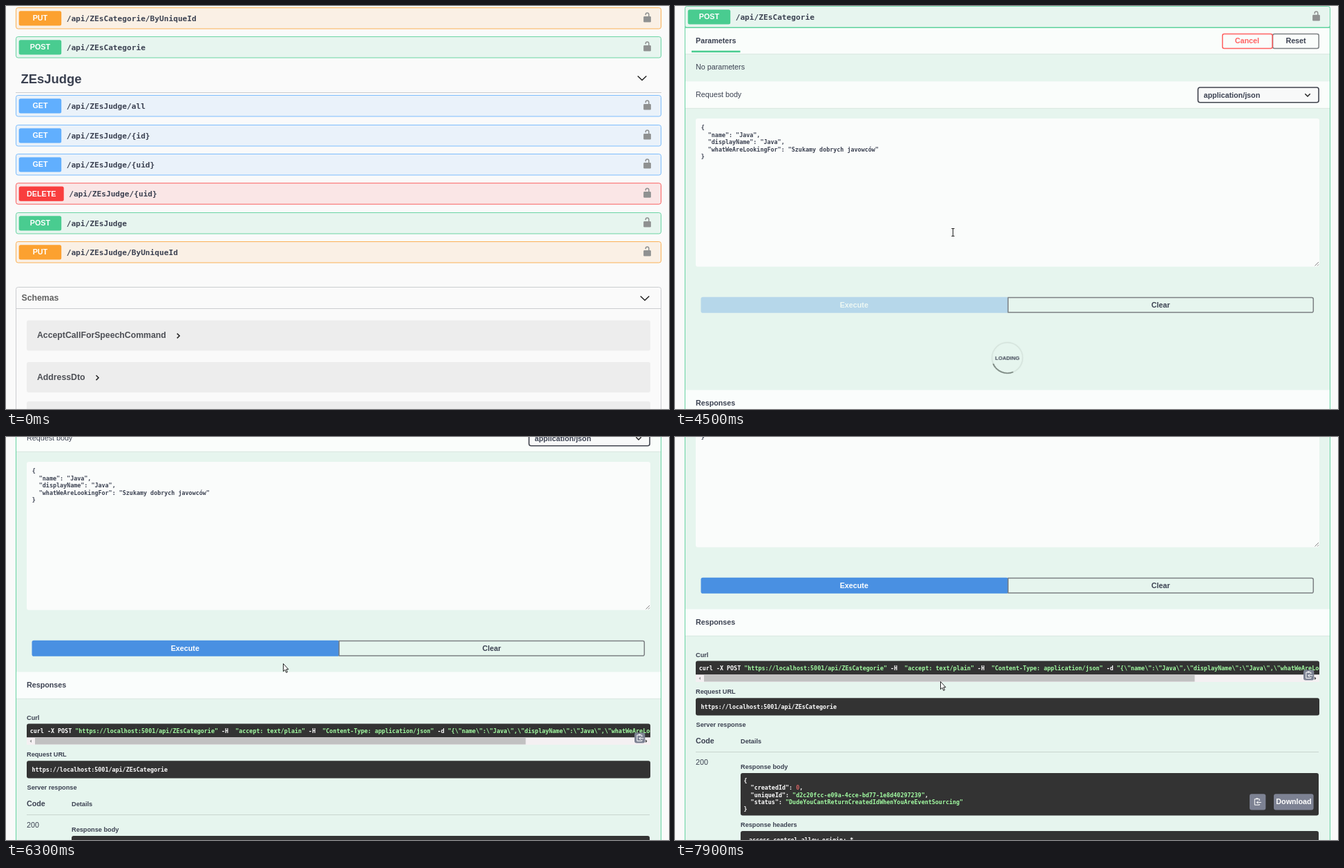
Write an HTML page that moves like this. It is 960 by 584 pixels and loops after 8000 ms.

```html
<!DOCTYPE html>
<html lang="en">
<head>
<meta charset="utf-8">
<title>API console</title>
<style>
html, body { margin: 0; width: 100%; height: 100%; overflow: hidden; background: #fafafa; }
svg { display: block; }
text { font: 10.74px "Liberation Sans", Arial, sans-serif; fill: #3b4151; white-space: pre; }
.b { font-weight: bold; }
.s { font-size: 9.2px; font-weight: bold; }
.l { font-size: 12.27px; font-weight: bold; fill: #4d4f55; }
.h { font-size: 18.4px; font-weight: bold; }
.m { font: bold 8.4px "DejaVu Sans Mono", monospace; }
.path { font: bold 11.16px "DejaVu Sans Mono", monospace; }
.w { fill: #fff; }
.str { fill: #a2fca2; }
.num { fill: #d36363; }
.c { text-anchor: middle; }
.line { fill: none; stroke: #222; stroke-width: 1.5; }
.rule { stroke: #cbcdd0; fill: none; }
.band { fill: #fff; fill-opacity: .8; }
.edge { stroke: #d9e7e0; }
.btn { fill: none; stroke: #7c8083; stroke-width: 1.5; }
.dark { fill: #333; }
.tool { fill: #7d8293; }
.schema { fill: #ededed; }

/* one loop is 8 s, so 1.25% is 100 ms */
.a { animation: 8s step-end infinite; }
#closed { animation-name: closed; }
#open { animation-name: open; opacity: 0; }
#page { animation-name: scroll; }
#tail { animation-name: push; }
#exec { animation-name: exec; }
#loader { animation-name: loader; opacity: 0; }
#arc { animation-name: spin; }
#cursor { animation-name: move; }
#arrow { animation-name: arrow; }
#hand { animation-name: hand; }
#beam { animation-name: beam; }

@keyframes closed { 0% { opacity: 1 } 18.75%, 100% { opacity: 0 } }
@keyframes open { 0% { opacity: 0 } 18.75%, 100% { opacity: 1 } }
@keyframes scroll {
  0% { transform: translateY(0) }
  50% { transform: translateY(0); animation-timing-function: steps(9) }
  61.25% { transform: translateY(-79.3px); animation-timing-function: steps(8) }
  71.25% { transform: translateY(-143px); animation-timing-function: steps(6) }
  78.75% { transform: translateY(-171px); animation-timing-function: steps(2) }
  81.25% { transform: translateY(-179px) }
  82.5% { transform: translateY(-179px); animation-timing-function: steps(6) }
  90% { transform: translateY(-209.5px); animation-timing-function: steps(7) }
  98.75%, 100% { transform: translateY(-262px) }
}
@keyframes push {
  0% { transform: translateY(0) }
  47.5% { transform: translateY(89px) }
  75%, 100% { transform: translateY(0) }
}
@keyframes exec {
  0% { opacity: 1 } 47.5% { opacity: .9 } 51.25% { opacity: .3 } 75%, 100% { opacity: 1 }
}
@keyframes loader { 0% { opacity: 0 } 47.5% { opacity: 1 } 75%, 100% { opacity: 0 } }
@keyframes spin {
  0% { transform: rotate(-433deg) }
  47.5% { transform: rotate(-433deg); animation-timing-function: steps(22) }
  75%, 100% { transform: rotate(433deg) }
}
@keyframes move {
  0% { transform: translate(915px, 35px) }
  11.25% { transform: translate(915px, 35px); animation-timing-function: steps(5) }
  17.5% { transform: translate(424px, 66px) }
  25% { transform: translate(423px, 65px) }
  28.75% { transform: translate(423px, 65px); animation-timing-function: steps(4) }
  33.75% { transform: translate(398px, 210px); animation-timing-function: steps(5) }
  40% { transform: translate(297px, 458px); animation-timing-function: steps(3) }
  43.75% { transform: translate(297px, 481px) }
  50% { transform: translate(297px, 481px); animation-timing-function: steps(3) }
  53.75% { transform: translate(401px, 328px) }
  93.75% { transform: translate(401px, 328px); animation-timing-function: steps(4) }
  98.75%, 100% { transform: translate(384px, 354px) }
}
@keyframes arrow {
  0% { opacity: 0 } 1.25% { opacity: 1 } 13.75% { opacity: 0 }
  30% { opacity: 1 } 33.75% { opacity: 0 } 40% { opacity: 1 } 41.25% { opacity: 0 }
  51.25% { opacity: 1 } 52.5% { opacity: 0 } 75%, 100% { opacity: 1 }
}
@keyframes hand {
  0% { opacity: 0 } 13.75% { opacity: 1 } 30% { opacity: 0 }
  41.25% { opacity: 1 } 51.25%, 100% { opacity: 0 }
}
@keyframes beam {
  0% { opacity: 0 } 33.75% { opacity: 1 } 40% { opacity: 0 }
  52.5% { opacity: 1 } 75%, 100% { opacity: 0 }
}
</style>
</head>
<body>
<svg width="960" height="584" viewBox="0 0 960 584">
  <defs>
    <g id="lock" fill="#8f9191">
      <rect x="-5.4" y="-2" width="10.8" height="8.6" rx="1.3"/>
      <path d="M-2.3-3.6V-4.6a2.3 2.3 0 0 1 4.6 0V-1" fill="none" stroke="#8f9191" stroke-width="1.5"/>
    </g>
    <path id="down" class="line" d="M-6.3-3 0 3 6.3-3"/>
    <path id="right" class="line" d="M-1.8-3.4 1.7 0-1.8 3.4"/>
    <g id="copy" fill="none" stroke="#fff">
      <path d="M3-1.5V-4H-4V4.5H3V3"/>
      <path d="M-2-4.6H1" stroke-width="1.6"/>
      <path d="M5.5 .8H-1M1.2-1.4-1 .8 1.2 3"/>
    </g>
  </defs>

  <g id="page" class="a">
    <g id="top"></g>

    <g id="closed" class="a">
      <text class="h" x="21.5" y="112">ZEsJudge</text>
      <use href="#down" x="921" y="104.5"/>
      <path class="rule" d="M14 125.5H949"/>
      <g id="rows"></g>
      <rect class="rule" x="14.5" y="407.5" width="934" height="300" rx="3"/>
      <path class="rule" d="M14.5 438.5H948.5"/>
      <text class="l" x="22.5" y="427" style="fill:#606060">Schemas</text>
      <use href="#down" x="925" y="423.5"/>
      <rect class="schema" x="30" y="455.5" width="903" height="44" rx="3"/>
      <rect class="schema" x="30" y="516" width="903" height="44" rx="3"/>
      <rect class="schema" x="30" y="573" width="903" height="44" rx="3"/>
      <text class="l" x="45" y="481">AcceptCallForSpeechCommand</text>
      <use href="#right" x="249.5" y="478"/>
      <text class="l" x="45" y="541.7">AddressDto</text>
      <use href="#right" x="132.3" y="538.7"/>
    </g>

    <g id="open" class="a">
      <rect x="14" y="76" width="935" height="900" fill="#e6f5ee"/>
      <path d="M14.5 73V980M948.5 73V980M14.5 75.5H948.5" stroke="#49cc90" stroke-opacity=".8" fill="none"/>

      <rect class="band" x="15" y="76" width="933" height="37.5"/>
      <path class="edge" d="M15 113.8H948"/>
      <text class="b" x="30" y="98.3">Parameters</text>
      <rect x="24" y="108.7" width="70.5" height="2.6" fill="#49cc90"/>
      <rect class="btn" x="865.5" y="84.5" width="66.7" height="21" rx="2.5"/>
      <rect class="btn" x="792.7" y="84.5" width="72.3" height="21" rx="2.5" style="stroke:#ff6060"/>
      <text class="b c" x="828.3" y="98.3" style="fill:#ff6060">Cancel</text>
      <text class="b c" x="899" y="98.3">Reset</text>
      <text x="30" y="135.5">No parameters</text>

      <rect class="band" x="15" y="153.3" width="933" height="38.7"/>
      <path class="edge" d="M15 192.3H948"/>
      <text x="30" y="176">Request body</text>
      <rect x="757.3" y="162" width="174.8" height="21.7" rx="3" fill="#f8f9f9" stroke="#41444e" stroke-width="1.6"/>
      <text class="b" x="765.5" y="176.7">application/json</text>
      <path class="line" d="M912.3 171.3 916 175 919.7 171.3"/>

      <rect x="30" y="207" width="903" height="214.7" rx="3" fill="#fafcfb"/>
      <g id="json"></g>
      <path d="M926.5 420.5 932 415M930 420.5 932 418.5" stroke="#777" stroke-width=".9"/>

      <g id="exec" class="a">
        <rect x="37.5" y="465.7" width="445" height="23" rx="2.8" fill="#4990e2"/>
        <text class="b c w" x="259.3" y="481.2">Execute</text>
      </g>
      <path class="btn" d="M482.3 466.4H922a2.3 2.3 0 0 1 2.3 2.3V485.8a2.3 2.3 0 0 1-2.3 2.3H482.3Z"/>
      <text class="b c" x="703.3" y="481.2">Clear</text>

      <g id="loader" class="a">
        <g transform="translate(481.2 553.8)">
          <circle r="22.2" fill="none" stroke="#d3e1da" stroke-width="1.5"/>
          <path id="arc" class="a" d="M-15.7-15.7A22.2 22.2 0 0 1 15.7-15.7" fill="none" stroke="#66726c" stroke-width="1.5"/>
          <text class="b c" y="2.9" style="font-size:7.7px">LOADING</text>
        </g>
      </g>

      <g id="tail" class="a">
        <rect class="band" x="15" y="511.5" width="933" height="38.5"/>
        <path class="edge" d="M15 550.3H948"/>
        <text class="b" x="30" y="533.8">Responses</text>

        <text class="s" x="30" y="580.8">Curl</text>
        <rect x="30" y="603" width="903" height="14" fill="#f4f0f2"/>
        <path class="dark" d="M30 606.3V589.5a3 3 0 0 1 3-3H930a3 3 0 0 1 3 3V606.3Z"/>
        <svg x="30" y="586" width="903" height="21">
          <text class="m w" x="4.7" y="13.6">curl -X POST <tspan class="str">"https://localhost:5001/api/ZEsCategorie"</tspan> -H  <tspan class="str">"accept: text/plain"</tspan> -H  <tspan class="str">"Content-Type: application/json"</tspan> -d <tspan class="str">"{\"name\":\"Java\",\"displayName\":\"Java\",\"whatWeAreLookingFor</tspan></text>
        </svg>
        <rect x="42" y="607" width="710.5" height="9.5" fill="#c1c1c1"/>
        <path d="M37 609.5V614L34.5 611.7Z" fill="#999"/>
        <path d="M926 609.5V614L928.5 611.7Z" fill="#444"/>
        <rect class="tool" x="910" y="599.5" width="15.3" height="15" rx="3"/>
        <use href="#copy" x="917.8" y="607"/>

        <text class="s" x="30" y="633.7">Request URL</text>
        <rect class="dark" x="30" y="640.3" width="903" height="25.3" rx="3"/>
        <text class="m w" x="37.5" y="656.2">https://localhost:5001/api/ZEsCategorie</text>

        <text class="s" x="30.5" y="681.8">Server response</text>
        <text class="b" x="30" y="706.3">Code</text>
        <text class="s" x="95" y="706">Details</text>
        <path d="M30 718.5H932" stroke="#c9d5cf"/>
        <text x="30" y="736.5">200</text>

        <text class="s" x="95" y="742.7">Response body</text>
        <rect class="dark" x="95" y="749" width="837" height="61.5" rx="3"/>
        <g id="reply"></g>
        <rect class="tool" x="832" y="779.3" width="23.3" height="23.3" rx="3"/>
        <use href="#copy" x="843.3" y="790.7"/>
        <rect class="tool" x="867" y="779.3" width="57.6" height="23.3" rx="3"/>
        <text class="b c w" x="896" y="794.2">Download</text>

        <text class="s" x="95" y="826.7">Response headers</text>
        <rect class="dark" x="95" y="833" width="837" height="60" rx="3"/>
        <text class="m w" x="107" y="848.6">access-control-allow-origin: *</text>
      </g>
    </g>
  </g>

  <g id="cursor" class="a">
    <path id="arrow" class="a" d="M.5.5V11.7L3 9.3 4.8 13.4 6.5 12.7 4.8 8.7H8Z" fill="#fff" stroke="#111" stroke-width=".9"/>
    <path id="hand" class="a" d="M-1.2 9.3V1.6a1.3 1.3 0 0 1 2.6 0V6.4q2-.7 2.3.8 1.9-.5 2.2.9 1.6-.2 1.6 1.2V11.5q0 1.8-1.1 3.2V16H-.5V14.9q-2.9-3-4-5.4 .5-1.9 2-.7Z" fill="#fff" stroke="#111" stroke-width=".9"/>
    <path id="beam" class="a" d="M-.6-5.5H3.6M1.5-5.5V5.5M-.6 5.5H3.6" fill="none" stroke="#222"/>
  </g>
</svg>
<script>
const colors = { GET: '#61affe', POST: '#49cc90', PUT: '#fca130', DELETE: '#f93e3e' };
const fill = (id, html) => { document.getElementById(id).innerHTML = html; };

function row(y, method, path) {
  const color = colors[method];
  const w = method === 'DELETE' ? 65 : 61.5;
  return `<rect x="14.5" y="${y}" width="934" height="30.5" rx="3" fill="${color}" fill-opacity=".1"
      stroke="${color}" stroke-opacity=".8"/>
    <rect x="18.7" y="${y + 4.7}" width="${w}" height="21.4" rx="2.5" fill="${color}"/>
    <text class="b c w" x="${18.7 + w / 2}" y="${y + 18.8}">${method}</text>
    <text class="path" x="${w + 26.2}" y="${y + 19.1}">/api/${path}</text>
    <use href="#lock" x="928.5" y="${y + 14.4}"/>`;
}

const lines = (list, x, y, cls) => list.map((s, i) =>
  `<text class="m ${cls}" x="${x}" y="${y + i * 10.45}">${s}</text>`).join('');

fill('top', row(2.5, 'PUT', 'ZEsCategorie/ByUniqueId') + row(44.5, 'POST', 'ZEsCategorie'));

fill('rows', [
  [129.5, 'GET', '/all'], [172.5, 'GET', '/{id}'], [214.5, 'GET', '/{uid}'],
  [256.7, 'DELETE', '/{uid}'], [299.5, 'POST', ''], [341.5, 'PUT', '/ByUniqueId']
].map(([y, method, end]) => row(y, method, 'ZEsJudge' + end)).join(''));

fill('json', lines([
  '{', '  "name": "Java",', '  "displayName": "Java",',
  '  "whatWeAreLookingFor": "Szukamy dobrych javowców"', '}'
], 37.7, 223.2, ''));

const str = s => `<tspan class="str">"${s}"</tspan>`;
fill('reply', lines([
  '{', '  "createdId": <tspan class="num">0</tspan>,',
  `  "uniqueId": ${str('d2c20fcc-e09a-4cce-bd77-1e8d40297239')},`,
  `  "status": ${str('DudeYouCantReturnCreatedIdWhenYouAreEventSourcing')}`, '}'
], 99.5, 762.6, 'w'));
</script>
</body>
</html>
```
